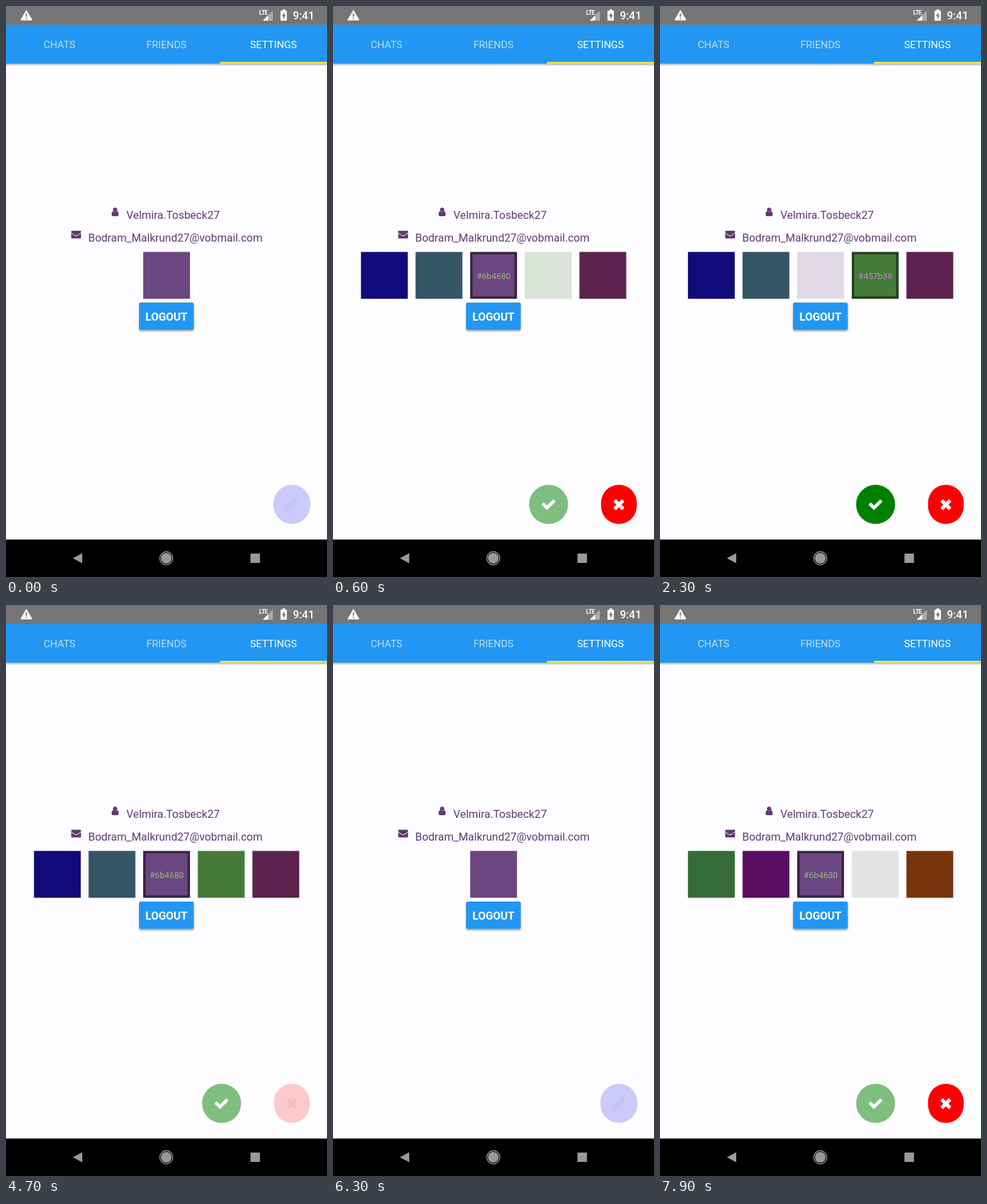
Animation of 480 by 853 pixels, one loop 8000 ms. Source, as an HTML page:

```html
<!DOCTYPE html>
<html lang="en">
<head>
<meta charset="utf-8">
<title>Colour settings</title>
<style>
html, body { margin: 0; height: 100%; overflow: hidden; background: #fefdff; }
svg { display: block; width: 480px; height: 853px; font-family: Roboto, Arial, sans-serif; }
.tabs { font-size: 15.17px; text-anchor: middle; fill: #fff; }
.info { font-size: 16.4px; fill: #5e3a72; }
.hex { font-size: 12.83px; text-anchor: middle; }
</style>
</head>
<body>
<svg viewBox="0 0 480 853">
  <defs>
    <linearGradient id="shade" x2="0" y2="1">
      <stop stop-color="#000" stop-opacity=".32"/>
      <stop offset="1" stop-color="#000" stop-opacity="0"/>
    </linearGradient>
    <filter id="lift" x="-20%" y="-20%" width="140%" height="150%">
      <feDropShadow dx="0" dy="2" stdDeviation="1.6" flood-opacity=".38"/>
    </filter>
  </defs>
  <rect width="480" height="853" fill="#fefdff"/>

  <!-- status bar -->
  <rect width="480" height="28" fill="#757575"/>
  <path d="M30.500 6.500L39 21H22Z" fill="#fff" stroke="#fff" stroke-linejoin="round"/>
  <path d="M30.500 11v5M30.500 17.500v2" stroke="#757575" stroke-width="1.800"/>
  <path d="M399 7v15h-15Z" fill="#fff" fill-opacity=".4"/>
  <path d="M392 14v8h-8Z" fill="#fff"/>
  <text x="378.500" y="13" font-size="8.800" font-weight="700" fill="#fff" textLength="" letter-spacing="-.5">LTE</text>
  <path d="M413.500 5h4v2h2.500v15h-9.500V7h3Z" fill="#fff"/>
  <path d="M416.300 9.500v4h2.200l-3.800 6.500v-4.800h-2.200Z" fill="#757575"/>
  <text x="429" y="20" font-size="16.330" font-weight="500" fill="#fff">9:41</text>

  <!-- tabs -->
  <rect y="86" width="480" height="4" fill="url(#shade)"/>
  <rect y="28" width="480" height="58" fill="#2196f3"/>
  <rect x="320" y="83.500" width="160" height="2.500" fill="#ffeb3b"/>
  <g class="tabs">
    <text x="80" y="63" opacity=".7">CHATS</text>
    <text x="240" y="63" opacity=".7">FRIENDS</text>
    <text x="400" y="63">SETTINGS</text>
  </g>

  <!-- profile -->
  <g class="info">
    <circle cx="163.200" cy="304.500" r="3.200"/>
    <path d="M160 306.500q3.200 2.800 6.400 0q2 .4 2.100 5q0 2.400-1.800 2.400h-7q-1.800 0-1.800-2.400q.1-4.600 2.100-5Z"/>
    <rect x="97.500" y="335.700" width="14.700" height="11.500" rx="1.300"/>
    <path d="M97 338.300q1 1.300 5.500 4.200q2.350 1.700 4.700 0q4.500-2.900 5.500-4.200" fill="none" stroke="#fefdff"/>
    <text x="180" y="318">Velmira.Tosbeck27</text>
    <text x="123" y="351.500">Bodram_Malkrund27@vobmail.com</text>
  </g>
  <rect x="199" y="443" width="81.700" height="40.800" rx="2.300" fill="#2196f3" filter="url(#lift)"/>
  <text x="240" y="470" font-size="16.330" font-weight="700" text-anchor="middle" fill="#fff">LOGOUT</text>

  <g id="view"></g>

  <!-- navigation bar -->
  <rect y="797" width="480" height="56" fill="#000"/>
  <g fill="#999">
    <path d="M100 825l14-7.500v15Z"/>
    <circle cx="239.700" cy="825" r="8"/>
    <circle cx="239.700" cy="825" r="9.800" fill="none" stroke="#aaa" stroke-width="1.200"/>
    <rect x="365.500" y="818" width="14.300" height="14" rx="1"/>
  </g>
</svg>
<script>
const LOOP = 8000, PURPLE = '#6b4680', GREEN = '#457b38';
const inks = { [PURPLE]: ['#352340', '#94b97f'], [GREEN]: ['#223d1c', '#ba84c7'] };
const first = ['#110a7b', '#345566', PURPLE, GREEN, '#5a214c'];
const second = ['#356b39', '#5a0d60', PURPLE, '#6d7d73', '#77340b'];

// palette: open picker; picked: selected swatch; held: swatch under the finger
const scenes = [
  { at: 0, pressed: true },
  { at: 500, palette: first, picked: 2 },
  { at: 600, palette: first, picked: 2, held: 3 },
  { at: 2200, palette: first, picked: 3 },
  { at: 2300, palette: first, picked: 3, held: 2 },
  { at: 4700, palette: first, picked: 2, pressed: true },
  { at: 6200 },
  { at: 6300, pressed: true },
  { at: 7700, palette: second, picked: 2 },
  { at: 7900, palette: second, picked: 2, held: 3 }
];

const PENCIL = 'M491 1536l91-91-235-235-91 91v107h128v128h107zm523-928q0-22-22-22-10 0-17 7l-542 542q-7 7-7 17 0 22 22 22 10 0 17-7l542-542q7-7 7-17zm-54-192l416 416-832 832h-416v-416zm683 96q0 53-37 90l-166 166-416-416 166-165q36-38 90-38 53 0 91 38l235 234q37 39 37 91z';
const CHECK = 'M1671 566q0 40-28 68l-724 724-136 136q-28 28-68 28t-68-28l-136-136-362-362q-28-28-28-68t28-68l136-136q28-28 68-28t68 28l294 295 656-657q28-28 68-28t68 28l136 136q28 28 28 68z';

const swatch = (i, color, opacity = 1) =>
  `<rect x="${41.8 + 81.67 * i}" y="367.4" width="70" height="70" fill="${color}" opacity="${opacity}"/>`;

function pickedSwatch(i, color) {
  const [edge, ink] = inks[color], x = 41.8 + 81.67 * i;
  return swatch(i, edge) +
    `<rect x="${x + 3.6}" y="371" width="62.8" height="62.8" fill="${color}"/>` +
    `<text class="hex" x="${x + 35.1}" y="408" fill="${ink}">${color}</text>`;
}

const button = (cx, width, fill) =>
  `<rect x="${cx - width / 2}" y="715.3" width="${width}" height="58.4" rx="${width / 2}" fill="${fill}"/>`;

const icon = (path, cx, midX, midY, fill) =>
  `<path d="${path}" fill="${fill}" transform="translate(${cx} 745) scale(.013) translate(${-midX} ${-midY})"/>`;

const cross = fill => [45, -45].map(a =>
  `<rect x="-9.1" y="-2.7" width="18.2" height="5.4" rx="1.2" fill="${fill}" transform="translate(427.5 745) rotate(${a})"/>`).join('');

function render({ palette, picked, held, pressed }) {
  if (!palette) {
    return swatch(2, PURPLE) + button(427.5, 55.4, pressed ? '#cacafd' : '#00f') +
      icon(PENCIL, 427, 886, 941, pressed ? '#c7c2ee' : '#fff');
  }
  const row = palette.map((color, i) =>
    i === picked ? pickedSwatch(i, color) : swatch(i, color, i === held ? 0.2 : 1));
  return row.join('') +
    button(322.4, 58.4, picked === 2 ? '#7ebe7e' : '#008000') + icon(CHECK, 322.3, 896, 928, '#fff') +
    button(427.5, 53.4, pressed ? '#fdcac9' : '#f00') + cross(pressed ? '#eec1c0' : '#fff');
}

const view = document.getElementById('view');
let shown;
function tick() {
  const t = performance.now() % LOOP;
  const scene = scenes.findLast(s => s.at <= t);
  if (scene !== shown) view.innerHTML = render(shown = scene);
  requestAnimationFrame(tick);
}
tick();
</script>
</body>
</html>
```
